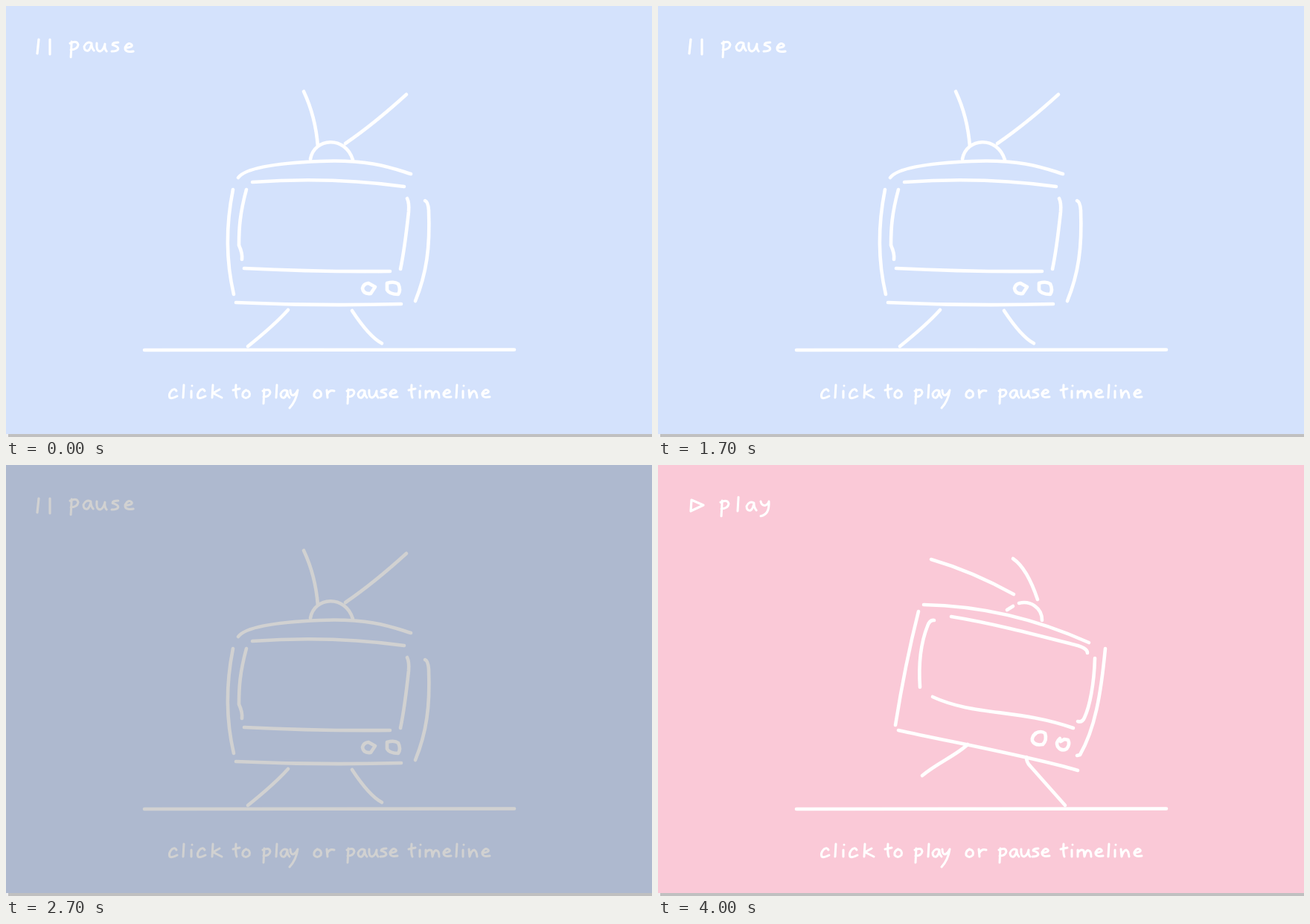
These frames come from a looping animation (868x580 px, 4.1 s). An HTML page with a canvas:

```html
<!DOCTYPE html>
<html lang="en">
<head>
<meta charset="utf-8">
<title>Walking television</title>
<style>
  html, body { margin: 0; width: 100%; height: 100%; overflow: hidden; }
  canvas { display: block; }
</style>
</head>
<body>
<canvas id="stage" width="868" height="580" role="img" aria-label="click to play or pause timeline"></canvas>
<script>
const ctx = document.getElementById('stage').getContext('2d');
const TICK = 100, TICKS = 41;
const BLUE = [212, 226, 252], PINK = [251, 188, 207], PALE = [250, 201, 215];

// Handwritten letters: baseline at y = 0, left edge at x = 0
const glyphs = {
  c: 'M10-9Q8-13 4-10Q-1-5 1 0Q4 2 11-2',
  l: 'M1-17L0 0',
  i: 'M0-9L0 0M1-16v.1',
  k: 'M1-17L0 0M10-11L1-6L13 0',
  t: 'M0-10L9-12M4-17Q3-5 5 0',
  o: 'M5-10Q-1-8 0-2Q4 3 9-2Q11-9 4-10',
  p: 'M2-11L1 8M0-9Q9-13 10-7Q9-1 1-1',
  a: 'M9-9Q3-12 0-5Q0 1 5 0Q8-2 9-9Q9-3 12 0',
  y: 'M0-10Q0-3 4-3Q8-5 10-10Q8 4-1 14',
  Y: 'M0-10Q1-5 5-5Q9-6 10-10Q11 6 0 8',
  r: 'M0-10L1 0M1-5Q4-11 10-9',
  u: 'M0-10Q-1 0 4 0Q8-1 10-9Q9-3 12 0',
  s: 'M8-11Q1-11 1-8Q8-6 8-3Q7 0 0 0',
  e: 'M1-5Q11-6 9-9Q5-13 1-6Q0 1 11-1',
  m: 'M0-9L0 0M0-5Q4-11 8-8L9 0Q11-10 15-8Q18-7 18 0',
  n: 'M0-10L1 0Q3-8 7-9Q10-8 11 0'
};
for (const key in glyphs) glyphs[key] = new Path2D(glyphs[key]);

const caption = [
  ['click', [219, 238, 249, 257, 277]],
  ['to', [305, 318]],
  ['play', [345, 363, 369, 382]],
  ['or', [414, 431]],
  ['pause', [458, 473, 488, 503, 515]],
  ['timeline', [541, 556, 564, 587, 605, 614, 622, 639]]
];

// Each label has three wobbling versions: letter x positions and baselines
const labels = {
  pause: [
    [[86, 105, 122, 142, 159], [60, 60, 61, 61, 62]],
    [[87, 105, 124, 141, 158], [57, 58, 62, 61, 60]],
    [[86, 104, 122, 142, 159], [58, 59, 60, 60, 60]]
  ],
  plaY: [
    [[84, 107, 119, 138], [60, 62, 61, 60]],
    [[81, 106, 120, 137], [59, 62, 60, 62]],
    [[80, 107, 118, 137], [59, 60, 60, 64]]
  ]
};
const pauseIcon = new Path2D('M44 45L42 64M59 45V65');
const playIcon = new Path2D('M45 47L61 54L44 62Z');
const ground = new Path2D('M186 463L683 462.5');

const upright = new Path2D(
  'M400 115Q416 149 419 189M538 119Q494 159 456 185M409 206C414 177 456 174 466 207' +
  'M312 231C320 220 350 212 421 209S521 219 544 226M331 237C400 232 470 234 535 243' +
  'M305 247C295 297 296 345 306 388M323 247C314 280 313 300 313 322Q318 333 317 341' +
  'M539 259Q542 265 541 277C538 305 534 335 530 354M563 262Q567 263 568 275C570 325 565 360 550 397' +
  'M320 353Q420 358 516 357M309 399Q420 404 531 401M379 409Q360 430 325 458M465 410Q488 445 505 454');
const mirrored = new Path2D();
mirrored.addPath(upright, new DOMMatrix([-1, 0, 0, 1, 851.5, 0]));
upright.addPath(new Path2D(
  'M487 373L496 378L490 387Q480 388 479 380Q480 374 487 373ZM512 373Q522 370 527 374Q531 382 527 388Q515 388 512 382Z'));
mirrored.addPath(new Path2D(
  'M486 368Q481 373 482 378Q488 386 494 382Q499 375 495 368L491 371L485 369' +
  'M513 368L511 378Q517 382 525 380Q529 374 526 366L522 366M513 368L517 370'));

const leanForward = new Path2D(
  'M367 127Q422 143 478 174M477 126Q496 139 510 181M469 195L477 190M485 186C500 182 516 192 516 209' +
  'M357 188Q470 190 579 239M394 204C450 213 510 229 564 243Q577 247 577 253' +
  'M350 197Q332 268 319 350M371 209Q365 208 362 217C353 240 350 270 352 299' +
  'M587 260C586 295 580 325 573 340Q570 347 564 345M601 247C595 310 587 355 567 390L563 391' +
  'M369 312C425 338 485 328 558 354M323 357C390 372 500 392 564 411' +
  'M507 361Q515 357 520 361Q523 370 517 376Q506 378 503 371Q502 365 508 361' +
  'M540 368Q534 373 537 379Q542 386 549 382Q554 376 551 370L546 369L541 372' +
  'M416 376C402 390 375 401 355 418M495 393Q495 400 500 405L547 458');
const leanBack = new Path2D(
  'M343 126C338 142 346 160 359 182M402 86C386 108 381 130 384 165M347 202C362 177 395 163 404 186' +
  'M258 239L246 241Q370 207 495 174M274 247C340 222 410 206 480 201' +
  'M239 259C252 308 270 350 302 411M257 253C263 295 272 335 295 358' +
  'M503 207C510 214 515 232 522 254S534 288 531 303M518 175Q530 242 552 293' +
  'M305 372L301 377C360 368 430 330 498 321Q506 320 509 316M320 410L563 330' +
  'M482 334Q490 328 495 334Q498 341 490 344Q479 345 480 339Q482 332 490 331' +
  'M513 320Q518 315 524 319Q522 328 515 333Q508 333 510 327Z' +
  'M378 388L381 391C376 430 362 438 350 446L324 460L314 460M459 366C478 380 510 380 545 384V387');
const walk = [upright, leanForward, mirrored, leanBack];

const clamp = v => Math.min(1, Math.max(0, v));
const mix = (a, b, t) => a.map((v, i) => v + (b[i] - v) * t);

function stroke(path, width) {
  ctx.lineWidth = width;
  ctx.stroke(path);
}

function write(word, xs, ys, size) {
  [...word].forEach((letter, i) => {
    ctx.save();
    ctx.translate(xs[i], ys[i] ?? ys[0]);
    ctx.scale(size, size);
    stroke(glyphs[letter], 3 / size);
    ctx.restore();
  });
}

function draw(tick) {
  // Clicks toggle the walk at ticks 19, 27 and 29
  const lastClick = [29, 27, 19].find(c => tick >= c);
  const paused = lastClick === 19 || lastClick === 29;
  const held = tick === 30 ? 29 : tick;
  const age = held - (lastClick ?? -9) - (tick > 30 ? 1 : 0);
  const shade = Math.max(0, 0.18 - 0.04 * age);
  const step = tick < 19 ? Math.floor(tick * 1.2) : tick < 27 ? 3 : tick === 27 ? 4 : 5;
  const paper = paused ? mix(PINK, PALE, clamp((tick - 30) / 5)) : BLUE;

  ctx.fillStyle = `rgb(${paper})`;
  ctx.fillRect(0, 0, 868, 576);
  ctx.strokeStyle = '#fff';
  stroke(ground, 4.6);
  stroke(walk[step % 4], 4.6);
  for (const [word, xs] of caption) write(word, xs, [527], 1);

  const word = paused ? 'plaY' : 'pause';
  const version = paused ? Math.floor(held * 1.2 + 0.3) : Math.floor(held * 1.1);
  write(word, ...labels[word][version % 3], 1.1);
  stroke(paused ? playIcon : pauseIcon, 3.2);

  ctx.fillStyle = `rgba(0, 0, 0, ${shade})`;
  ctx.fillRect(0, 0, 868, 576);
  ctx.fillStyle = '#f0f0f0';
  ctx.fillRect(0, 576, 3, 4);
  ctx.fillStyle = '#c0c0c0';
  ctx.fillRect(3, 576, 865, 4);
}

ctx.lineCap = ctx.lineJoin = 'round';
const start = performance.now();
function frame() {
  draw(Math.floor((performance.now() - start) / TICK) % TICKS);
  requestAnimationFrame(frame);
}
frame();
</script>
</body>
</html>
```
